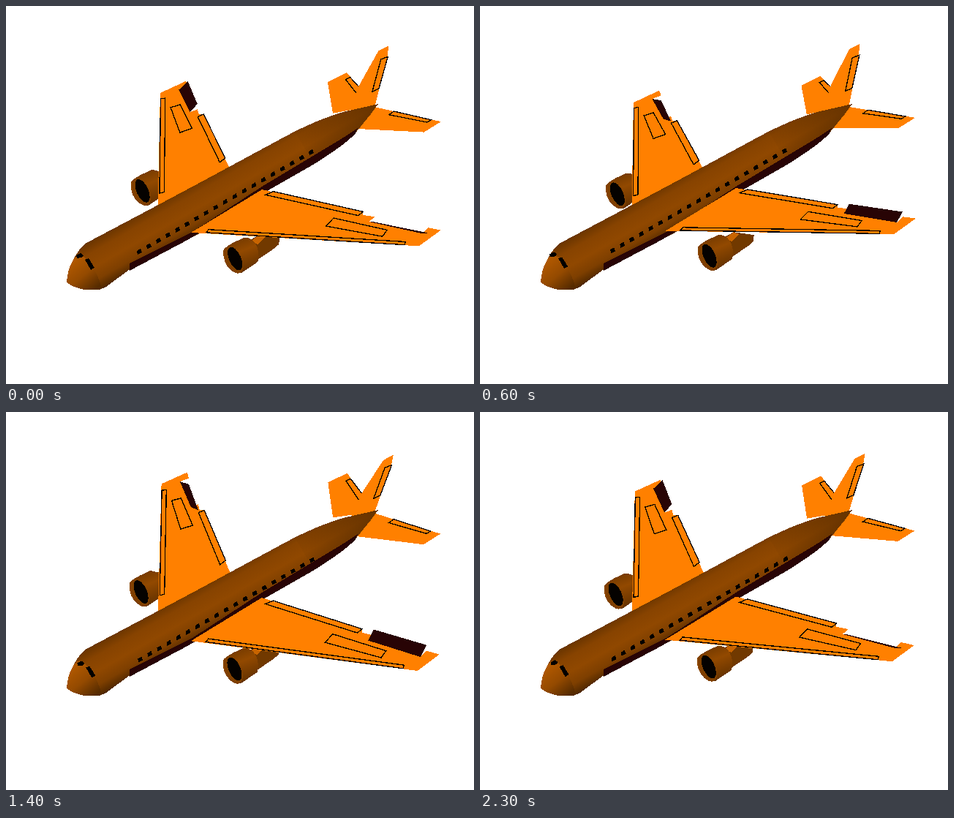
Animation of 640 by 517 pixels, one loop 2400 ms. Source, as an HTML page:

```html
<!DOCTYPE html>
<html lang="en">
<head>
<meta charset="utf-8">
<title>Rolling airliner</title>
<style>
  html, body { margin: 0; width: 100%; height: 100%; overflow: hidden; background: #fff; }
  svg { display: block; width: 100%; height: 100%; }
</style>
</head>
<body>
<svg id="stage" viewBox="0 0 640 517" shape-rendering="crispEdges">
  <defs>
    <linearGradient id="skin" gradientUnits="userSpaceOnUse" x1="169" y1="291" x2="202" y2="349">
      <stop offset="0" stop-color="#6a3500"/>
      <stop offset=".22" stop-color="#874300"/>
      <stop offset=".5" stop-color="#904800"/>
      <stop offset=".75" stop-color="#7e3f00"/>
      <stop offset="1" stop-color="#482400"/>
    </linearGradient>
    <linearGradient id="taper" gradientUnits="userSpaceOnUse" x1="395" y1="195" x2="509" y2="134">
      <stop offset="0" stop-color="#502800" stop-opacity="0"/>
      <stop offset="1" stop-color="#502800" stop-opacity=".65"/>
    </linearGradient>
    <linearGradient id="nose" gradientUnits="userSpaceOnUse" x1="88" y1="352" x2="118" y2="390">
      <stop offset="0" stop-color="#b05800"/>
      <stop offset=".5" stop-color="#944a00"/>
      <stop offset="1" stop-color="#562b00"/>
    </linearGradient>
    <linearGradient id="cowl" x1=".3" y1="0" x2=".7" y2="1">
      <stop offset="0" stop-color="#703800"/>
      <stop offset=".4" stop-color="#924900"/>
      <stop offset="1" stop-color="#5e2f00"/>
    </linearGradient>
  </defs>
</svg>
<script>
const STEP = 100, STEPS = 24, CYCLE = 25, PEAK = 4.9;
const ORANGE = { fill: '#ff8000' }, DARK = { fill: '#280405' };
const LINE = { fill: 'none', stroke: '#000', 'stroke-width': 1.3 };
const WING_LEAN = [0.01, -0.126], FIN_LEAN = [0.117, 0.072];
const stage = document.getElementById('stage');
const movers = [];

function add(tag, attrs, parent = stage) {
  const node = document.createElementNS('http://www.w3.org/2000/svg', tag);
  for (const key in attrs) node.setAttribute(key, attrs[key]);
  parent.appendChild(node);
  return node;
}

// Rolling shifts a point in proportion to its distance from the fuselage axis.
function roll([x, y], r, lean) {
  const arm = 0.5 * (x - 417) + 0.866 * (y - 199) + 12;
  return [x + r * arm * lean[0], y + r * arm * lean[1]];
}

function shape(points, attrs, lean = WING_LEAN, tag = 'polygon') {
  const node = add(tag, attrs);
  movers.push((r, aileron) => {
    const list = typeof points === 'function' ? points(aileron) : points;
    node.setAttribute('points', list.map(p => roll(p, r, lean).map(v => v.toFixed(1)).join()).join(' '));
  });
}

function slide(node, [x, y], [dx, dy]) {
  movers.push(r => node.setAttribute('transform', `translate(${x + dx * r} ${y + dy * r})`));
}

const mix = (p, q, t) => p.map((v, i) => v + (q[i] - v) * t);

// Maps plan coordinates (span, chord) onto the screen; depth foreshortens the span.
const projector = (rootLead, rootTrail, tipLead, tipTrail, depth = 1) => ([span, chord]) => {
  const t = span * depth / (1 + (depth - 1) * span);
  return mix(mix(rootLead, tipLead, t), mix(rootTrail, tipTrail, t), chord);
};

const HINGE = [[0.65, 0.77], [0.94, 0.67]];
const AILERON_EDGE = [[0.93, 0.98], [0.64, 0.95]];
const WING_BOXES = [
  [[0.06, 0.02], [0.05, 0.09], [0.92, 0.18], [0.935, 0.02]],
  [[0.5, 0.45], [0.48, 0.7], [0.775, 0.59], [0.795, 0.32]],
  [[0.05, 0.92], [0.06, 1.01], [0.56, 1.02], [0.565, 0.89]]
];
const STAB_BOX = [[0.3, 1], [0.86, 0.98], [0.85, 0.77], [0.28, 0.8]];

function wing(project, root, side) {
  const plan = [[root, 0], [1, 0], [1, 1], AILERON_EDGE[0], HINGE[1], HINGE[0],
    AILERON_EDGE[1], [0.58, 0.93], [0.56, 1.02], [root, 1]];
  shape(plan.map(project), ORANGE);
  WING_BOXES.forEach(box => shape(box.map(project), LINE));
  const hinge = HINGE.map(project), edge = AILERON_EDGE.map(project);
  shape(aileron => [...hinge, ...edge.map(([x, y]) => [x, y - 7.5 * aileron * side])], DARK);
}

function stabilizer(project) {
  shape([[0, 0], [1, 0], [1, 1], [0, 1]].map(project), ORANGE);
  shape(STAB_BOX.map(project), LINE);
}

function engine(place, travel) {
  const g = add('g', {});
  add('path', { d: 'M20-25L34-33L62-29L61-20L54-14L32 1Z', fill: '#713900' }, g);
  add('path', { d: 'M22-24L34-33L42-30L32-20Z', fill: '#c86400' }, g);
  add('path', { d: 'M-15-12Q-12-17 0-23L13-29Q23-30 29-21Q36-8 32 4L10 19Q3 21-5 15Q-16 5-15-12Z', fill: 'url(#cowl)' }, g);
  add('ellipse', { cx: -1, cy: 1, rx: 11, ry: 19.5, fill: '#804000', transform: 'rotate(-24)' }, g);
  add('ellipse', { cx: 1, cy: 0, rx: 8, ry: 17, fill: '#050200', transform: 'rotate(-24)' }, g);
  slide(g, place, travel);
}

function fuselage() {
  add('path', { d: 'M83 378Q84 360 92 347Q100 331 110 324L180 287L270 239L380 179.5Q425 155 465 144L509 134L499 148L480 171Q465 188 420 214L350 252L265 311L168 361L137 384Q131 389 107 388Q92 385 83 378Z', fill: 'url(#skin)' });
  add('path', { d: 'M395 172Q440 150 465 144L509 134L480 171Q465 188 420 214Z', fill: 'url(#taper)' });
  add('path', { d: 'M83 378Q84 360 92 347Q99 336 106 343Q124 358 131 387Q124 389 107 388Q92 385 83 378Z', fill: 'url(#nose)' });
  add('path', { d: 'M169 352L255 309L350 247L440 193Q465 178 481 167L478 174Q465 189 420 217L350 257L250 319L169 362Z', ...DARK });

  const glazing = add('g', {});
  for (let i = 0; i < 19; i++) {
    const x = 182 + i * 235 / 18, y = 336 - i * 136 / 18;
    add('path', { d: `M${x - 3} ${y - 1}l5-3l2 5l-6 3z` }, glazing);
  }
  add('path', { d: 'M96 341L102 338L106 341L104 344L97 345Z' }, glazing);
  add('path', { d: 'M108 347L113 345L121 358L116 361Z' }, glazing);
  slide(glazing, [0.4, 0.8], [-1.3, -2.6]);
}

engine([185, 251], [2, 7]);
wing(projector([208, 266], [303, 215], [211.5, 112], [246.5, 96], 1.16), -0.1, -1);
stabilizer(projector([447, 146], [505, 136], [440, 101.5], [466, 88.5]));
stabilizer(projector([477, 168.5], [503, 138], [571.5, 175.5], [594.5, 161]));
shape([[470, 146], [483.5, 110.5], [511.5, 63], [525.5, 56], [523.5, 69.5], [504.5, 136.5]], ORANGE, FIN_LEAN);
shape([[514.5, 74], [524, 70.5], [510.5, 113.5], [501.5, 117.5]], LINE, FIN_LEAN);
fuselage();
engine([312, 348], [0.7, -6]);
wing(projector([253, 311], [350, 252], [564, 337], [594, 315]), 0, 1);

function draw(ms) {
  const step = Math.floor(ms / STEP) % STEPS;
  const phase = 2 * Math.PI * (step - PEAK) / CYCLE;
  const aileron = Math.sign(Math.sin(phase));
  movers.forEach(move => move(Math.cos(phase), aileron));
}

const start = performance.now();
function tick() {
  draw(performance.now() - start);
  requestAnimationFrame(tick);
}
tick();
</script>
</body>
</html>
```
